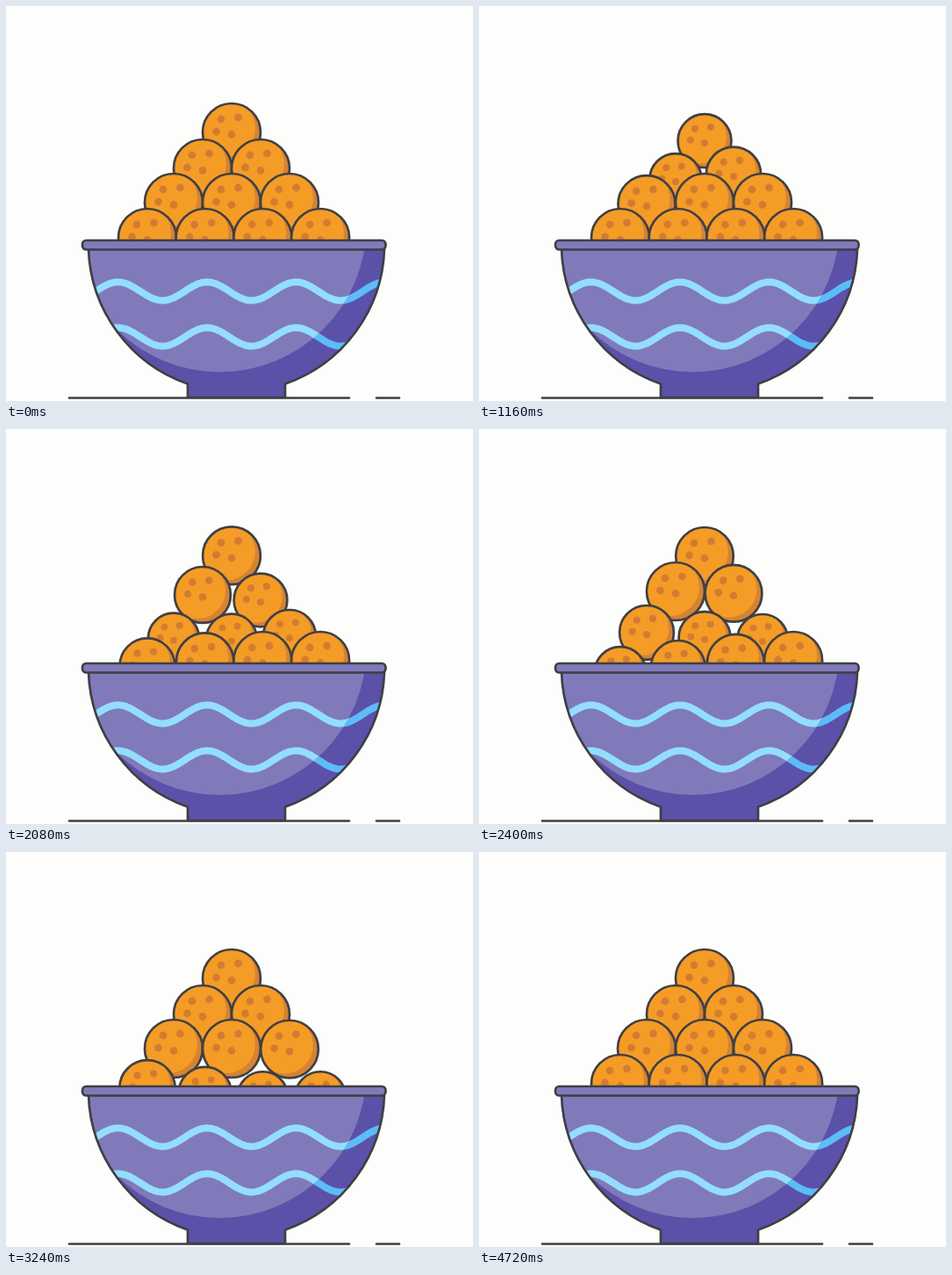
An HTML page with a canvas for the animation above (4.8 s loop, 532 px wide and 450 px high).

```html
<!DOCTYPE html>
<html lang="en">
<head>
<meta charset="utf-8">
<title>Bowl of bouncing balls</title>
<style>
  html, body { margin: 0; width: 100%; height: 100%; overflow: hidden; background: #fdfdfb; }
  canvas { display: block; }
</style>
</head>
<body>
<canvas id="stage" width="532" height="450"></canvas>
<script>
const ctx = document.getElementById('stage').getContext('2d');
const LOOP = 4800, STEP = 40, TAU = Math.PI * 2;
const RADIUS = 33, STAGGER = 240, DIP_TIME = 1920, DIP = 20;

const color = {
  paper: '#fdfdfb', line: '#3f3f44',
  ball: '#f49c26', ballShade: '#d48334', dot: '#d37c31',
  bowl: '#807abb', bowlShade: '#5b51a8',
  wave: '#93defd', waveShade: '#5cbcf8'
};

// Rows from the top of the pile down: [y, x of first ball, spacing]
const rows = [[144, 257, 0], [185, 224, 66], [224, 191, 66], [264, 161, 65.7]];
const balls = rows.flatMap(([y, x, gap], row) =>
  Array.from({ length: row + 1 }, (_, k) => ({ x: x + k * gap, y })));
const dots = [[-12, -15], [7.5, -17], [-17.5, -1], [0, 2.5]];

// Top ball: [time, drop]; it leaps, lands, leaps again and settles
const hop = [[0, 0], [400, -10.5], [1080, 13], [1760, -10.5], [2240, 4], [2480, 0], [LOOP, 0]];

const easeSine = p => (1 - Math.cos(Math.PI * p)) / 2;

function hopDrop(t) {
  const k = hop.findIndex(([time]) => time > t);
  const [t0, a] = hop[k - 1], [t1, b] = hop[k];
  return a + (b - a) * easeSine((t - t0) / (t1 - t0));
}

function dipDrop(t, index) {
  const p = (t - STAGGER * (index + 1)) / DIP_TIME;
  return p > 0 && p < 1 ? DIP * easeSine(2 * p) : 0;
}

function disc(x, y, r, fill) {
  ctx.beginPath();
  ctx.arc(x, y, r, 0, TAU);
  ctx.fillStyle = fill;
  ctx.fill();
}

function outline() {
  ctx.strokeStyle = color.line;
  ctx.lineWidth = 2.7;
  ctx.lineJoin = ctx.lineCap = 'round';
  ctx.stroke();
}

function drawBall({ x, y }, drop) {
  const shrink = Math.max(0, drop) * 0.21;
  const r = RADIUS - shrink, s = r / RADIUS;
  const cy = y + drop - shrink;
  ctx.save();
  disc(x, cy, r, color.ballShade);
  ctx.clip();
  disc(x - 6 * s, cy - 5 * s, r, color.ball);
  for (const [dx, dy] of dots) disc(x + dx * s, cy + dy * s, 4.4 * s, color.dot);
  ctx.restore();
  ctx.beginPath();
  ctx.arc(x, cy, r, 0, TAU);
  outline();
}

function bowlPath() {
  const cx = 262.5, cy = 271.3, r = 168.6;
  const rim = Math.asin((277 - cy) / r), foot = Math.acos(55.5 / r);
  ctx.beginPath();
  ctx.arc(cx, cy, r, rim, foot);
  ctx.lineTo(318, 446);
  ctx.lineTo(207, 446);
  ctx.arc(cx, cy, r, Math.PI - foot, Math.PI - rim);
  ctx.closePath();
}

function drawWaves(stroke) {
  ctx.strokeStyle = stroke;
  ctx.lineWidth = 8;
  for (const y of [325, 377]) {
    ctx.beginPath();
    for (let x = 88; x <= 436; x += 2)
      ctx.lineTo(x, y - 10.5 * Math.cos(TAU * (x - 229) / 101.4));
    ctx.stroke();
  }
}

function drawBowl() {
  ctx.save();
  bowlPath();
  ctx.fillStyle = color.bowlShade;
  ctx.fill();
  ctx.clip();
  drawWaves(color.waveShade);
  disc(243.5, 250, 167, color.bowl);
  ctx.clip();
  drawWaves(color.wave);
  ctx.restore();
  bowlPath();
  outline();

  ctx.beginPath();
  ctx.roundRect(87, 267, 345.5, 10.5, 4.5);
  ctx.fillStyle = color.bowl;
  ctx.fill();
  outline();
}

function drawGround() {
  ctx.beginPath();
  for (const [from, to] of [[72, 391], [422, 448]]) {
    ctx.moveTo(from, 446.5);
    ctx.lineTo(to, 446.5);
  }
  outline();
}

function render(now) {
  const t = Math.floor((now % LOOP) / STEP) * STEP;
  ctx.fillStyle = color.paper;
  ctx.fillRect(0, 0, 532, 450);
  balls.forEach((ball, i) => drawBall(ball, i ? dipDrop(t, i) : hopDrop(t)));
  drawBowl();
  drawGround();
}

const start = performance.now();
function tick() {
  render(performance.now() - start);
  requestAnimationFrame(tick);
}
tick();
</script>
</body>
</html>
```
